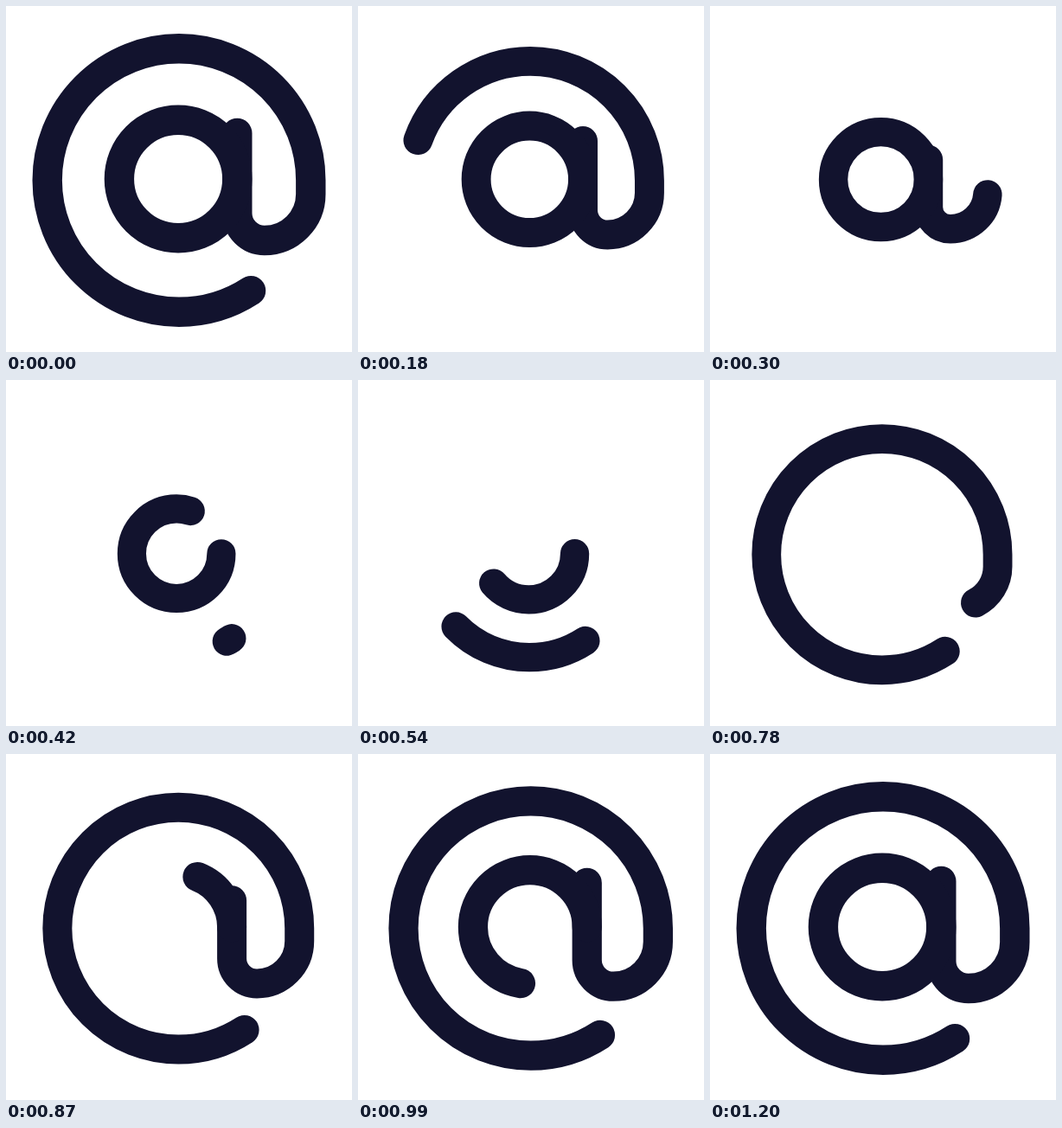
These frames come from a looping animation (400 px wide and 400 px high, 3.23 s). An HTML page with a canvas:

```html
<!DOCTYPE html>
<html lang="en">
<head>
<meta charset="utf-8">
<title>At sign</title>
<style>
  html, body { margin: 0; width: 100%; height: 100%; overflow: hidden; background: #fff; }
  canvas { display: block; width: 400px; height: 400px; }
</style>
</head>
<body>
<canvas id="stage"></canvas>
<script>
const SIZE = 400, LOOP = 3230, STEP = 30, LAST = 40;
const INK = '#12132e';
const PIVOT = { x: 191, y: 203 };
const SHRINK = 0.242;
const TAU = Math.PI * 2;

const canvas = document.getElementById('stage');
const ctx = canvas.getContext('2d');
const dpr = window.devicePixelRatio || 1;
canvas.width = canvas.height = SIZE * dpr;

// Outer stroke: stem, hook, then counter-clockwise to the tail.
const big = { x: 200, y: 201.5, r: 152.3 };
const stem = { x: 267.3, top: 147 };
const hook = { x: 298.8, bottom: 271, r: 53.5 };
const bend = hook.x - stem.x;
const tail = Math.atan2(127.5, 83);
const hookY = hook.bottom - hook.r;
const bendY = hook.bottom - bend;

const swirl = new Path2D();
swirl.moveTo(stem.x, stem.top);
swirl.arc(hook.x, bendY, bend, Math.PI, Math.PI / 2, true);
swirl.arc(hook.x, hookY, hook.r, Math.PI / 2, 0, true);
swirl.lineTo(big.x + big.r, big.y);
swirl.arc(big.x, big.y, big.r, 0, tail, true);
const swirlLen = bendY - stem.top + (bend + hook.r) * Math.PI / 2 +
  hookY - big.y + big.r * (TAU - tail);

const ringR = 68.2;
const ring = new Path2D();
ring.arc(stem.x - ringR, 200, ringR, 0, TAU);
const ringLen = ringR * TAU;

function smooth(from, to, k) {
  const u = Math.min(1, Math.max(0, (k - from) / (to - from)));
  return u * u * (3 - 2 * u);
}

// Strokes the part of a path between two fractions of its length.
function trim(path, len, from, to) {
  if (to - from < 0.001) return;
  ctx.setLineDash(from === 0 && to === 1 ? [] : [(to - from) * len, len * 4]);
  ctx.lineDashOffset = -from * len;
  ctx.stroke(path);
}

function draw(k) {
  const depth = SHRINK * (smooth(0, 14, k) - smooth(13.1, 39.1, k));
  const s = 1 - depth;

  ctx.setTransform(dpr, 0, 0, dpr, 0, 0);
  ctx.fillStyle = '#fff';
  ctx.fillRect(0, 0, SIZE, SIZE);
  ctx.translate(PIVOT.x * depth, PIVOT.y * depth);
  ctx.scale(s, s);
  ctx.strokeStyle = INK;
  ctx.lineCap = ctx.lineJoin = 'round';
  ctx.lineWidth = (34.4 - 5 * depth) / s;

  // Each stroke retracts to its start, then grows back from its end.
  trim(swirl, swirlLen, 0.036 * smooth(4, 14, k), 1 - smooth(0.5, 14, k));
  trim(swirl, swirlLen, 1 - smooth(13, 30.4, k), 1);
  trim(ring, ringLen, 0, 1 - smooth(10, 23.9, k));
  trim(ring, ringLen, 1 - smooth(26, 36.7, k), 1);
}

const start = performance.now();
function tick() {
  const t = (performance.now() - start) % LOOP;
  draw(Math.min(LAST, Math.floor(t / STEP)));
  requestAnimationFrame(tick);
}
tick();
</script>
</body>
</html>
```
